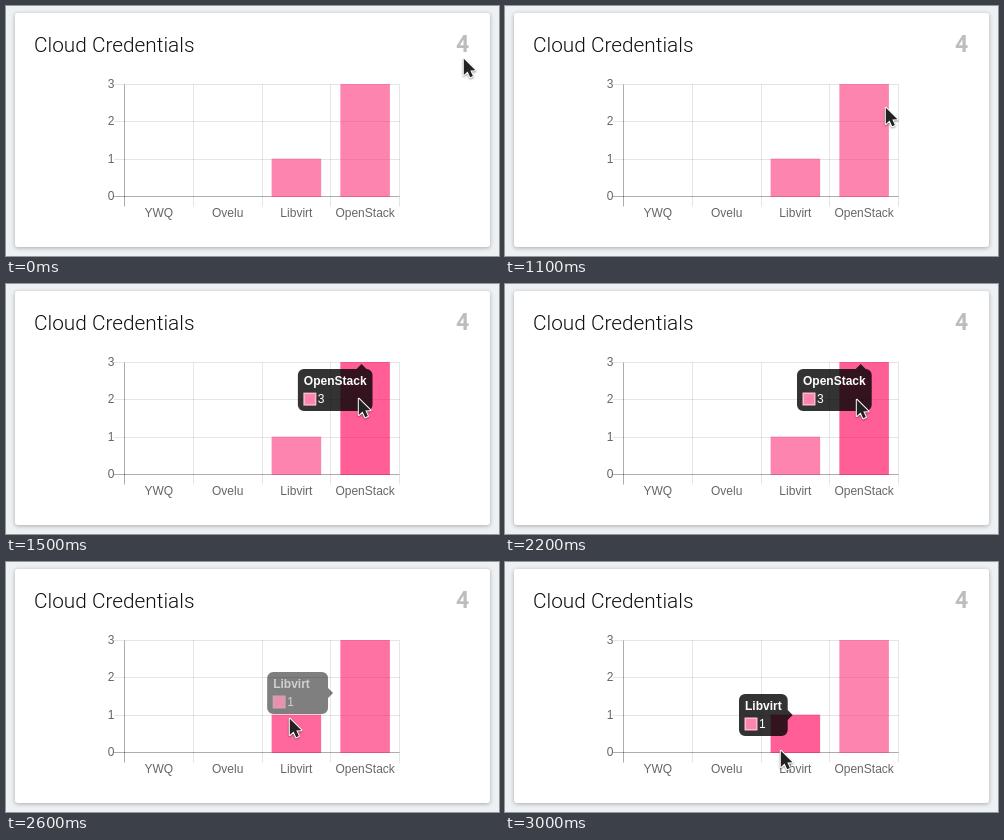
These frames come from a looping animation (493x250 px, 4.1 s). An HTML page with a canvas:

```html
<!DOCTYPE html>
<html lang="en">
<head>
<meta charset="utf-8">
<title>Cloud Credentials</title>
<style>
  html, body { margin: 0; width: 100%; height: 100%; overflow: hidden; background: #eef1f4; }
  .card {
    position: absolute; left: 9px; top: 7px; width: 475px; height: 234px;
    background: #fff; border-radius: 3px;
    box-shadow: 0 1px 4px rgba(0, 0, 0, .3);
  }
  .title, .count { position: absolute; top: 24px; line-height: 30px; white-space: nowrap; }
  .title { left: 28px; font: 300 20.8px/30px Roboto, sans-serif; color: #111; }
  .count { left: 450px; font: 700 23px/30px Roboto, sans-serif; color: #bdbdbd; }
  canvas { position: absolute; left: 0; top: 0; }
</style>
</head>
<body>
<div class="card"></div>
<div class="title">Cloud Credentials</div>
<div class="count">4</div>
<canvas id="stage" width="493" height="250"></canvas>
<script>
const ctx = document.getElementById('stage').getContext('2d');
const LOOP = 4100, STEP = 100;
const FONT = '12px "Liberation Sans", Arial, sans-serif';
const LEFT = 118.5, RIGHT = 393.5, TOP = 78.5, BASE = 190.5;
const SLOT = (RIGHT - LEFT) / 4;
const LABELS = ['YWQ', 'Ovelu', 'Libvirt', 'OpenStack'];

// Pointer path: [time, x, y], each position held until the next
const PATH = [
  [0, 457, 52], [700, 451, 57], [800, 436, 70], [900, 414, 84],
  [1100, 380, 101], [1200, 371, 106], [1300, 364, 109], [1400, 357, 112], [1500, 352, 114],
  [2200, 351, 115], [2300, 340, 123], [2400, 322, 135], [2500, 302, 146], [2600, 283, 156],
  [2700, 278, 167], [2800, 276, 176], [2900, 275, 183], [3000, 275, 188]
];
const ARROW = [[.8, .8], [.8, 17], [4.6, 13.6], [7.2, 19.3], [9.9, 18.1], [7.3, 12.6], [12.4, 12.2]];

const TIP_STACK = { x: 292, y: 85, w: 74.7 };
const TIP_VIRT = { x: 234, y: 132, w: 48.7 };

const mix = (a, b, k) => a + (b - a) * k;

function easeOut(t, start, span) {
  const p = Math.min(1, Math.max(0, (t - start) / span));
  return 1 - (1 - p) ** 4;
}

function line(x1, y1, x2, y2, alpha) {
  ctx.strokeStyle = `rgba(0,0,0,${alpha})`;
  ctx.lineWidth = 1;
  ctx.beginPath();
  ctx.moveTo(x1, y1);
  ctx.lineTo(x2, y2);
  ctx.stroke();
}

function text(str, x, y, align, color, weight = '') {
  ctx.font = `${weight} ${FONT}`;
  ctx.textAlign = align;
  ctx.fillStyle = color;
  ctx.fillText(str, x, y);
}

function drawAxes() {
  for (let i = 0; i <= 4; i++) {
    const x = Math.floor(LEFT + i * SLOT) + .5;
    line(x, TOP, x, 200.5, i ? .1 : .32);
    if (i < 4) text(LABELS[i], LEFT + (i + .5) * SLOT, 211, 'center', '#666');
  }
  for (let v = 0; v <= 3; v++) {
    const y = Math.floor(mix(BASE, TOP, v / 3)) + .5;
    line(108, y, RIGHT, y, v ? .1 : .32);
    text(v, 108.5, y + 3.5, 'right', '#666');
  }
}

function drawBar(slot, value, hover) {
  const w = SLOT * .72, x = LEFT + (slot + .5) * SLOT - w / 2;
  const y = mix(BASE, TOP, value / 3) - .5;
  ctx.fillStyle = `rgba(${mix(250, 255, hover)},${mix(50, 0, hover)},${mix(120, 90, hover)},${mix(.6, .63, hover)})`;
  ctx.fillRect(x, y, w, 191 - y);
}

function drawTip(name, value, { x, y, w }, alpha, side) {
  const h = 42, r = 6;
  ctx.save();
  ctx.globalAlpha = alpha;
  ctx.fillStyle = 'rgba(0,0,0,.8)';
  ctx.beginPath();
  ctx.moveTo(x + r, y);
  if (side === 'top') {
    const cx = x + w - 11;
    ctx.lineTo(cx - 5, y);
    ctx.lineTo(cx, y - 5);
    ctx.lineTo(cx + 5, y);
  }
  ctx.arcTo(x + w, y, x + w, y + r, r);
  if (side === 'right') {
    ctx.lineTo(x + w, y + h / 2 - 5);
    ctx.lineTo(x + w + 5, y + h / 2);
    ctx.lineTo(x + w, y + h / 2 + 5);
  }
  ctx.arcTo(x + w, y + h, x, y + h, r);
  ctx.arcTo(x, y + h, x, y, r);
  ctx.arcTo(x, y, x + w, y, r);
  ctx.fill();

  text(name, x + 6, y + 16, 'left', '#fff', 'bold');
  ctx.fillStyle = '#fdb9d1';
  ctx.fillRect(x + 5.5, y + 23.5, 13, 13);
  ctx.fillStyle = '#fd84ae';
  ctx.fillRect(x + 7, y + 25, 10, 10);
  text(value, x + 20, y + 34, 'left', '#fff');
  ctx.restore();
}

function drawPointer(t) {
  const [, x, y] = PATH.filter(p => p[0] <= t).pop();
  ctx.save();
  ctx.translate(x, y);
  ctx.beginPath();
  ARROW.forEach(([px, py]) => ctx.lineTo(px, py));
  ctx.closePath();
  ctx.lineJoin = 'round';
  ctx.lineWidth = 2;
  ctx.strokeStyle = '#fff';
  ctx.shadowColor = 'rgba(0,0,0,.4)';
  ctx.shadowBlur = 2;
  ctx.shadowOffsetY = 1;
  ctx.stroke();
  ctx.shadowColor = 'transparent';
  ctx.fillStyle = '#222';
  ctx.fill();
  ctx.restore();
}

function draw(t) {
  const enter = t < 1200 ? 0 : easeOut(t, 1028, 602);
  const leave = easeOut(t, 2514, 498);
  const place = enter * (1 - leave);
  const tip = {};
  for (const k of ['x', 'y', 'w']) tip[k] = mix(TIP_VIRT[k], TIP_STACK[k], place);

  ctx.clearRect(0, 0, 493, 250);
  drawAxes();
  drawBar(2, 1, Math.sqrt(leave));
  drawBar(3, 3, place);
  if (leave > 0) drawTip('Libvirt', 1, tip, Math.max(.6, .2 + .8 * leave), 'right');
  else if (enter > 0) drawTip('OpenStack', 3, tip, t < 2500 ? enter : .6, 'top');
  drawPointer(t);
}

const begin = performance.now();
function tick() {
  const t = (performance.now() - begin) % LOOP;
  draw(Math.floor(t / STEP) * STEP);
  requestAnimationFrame(tick);
}
tick();
</script>
</body>
</html>
```
